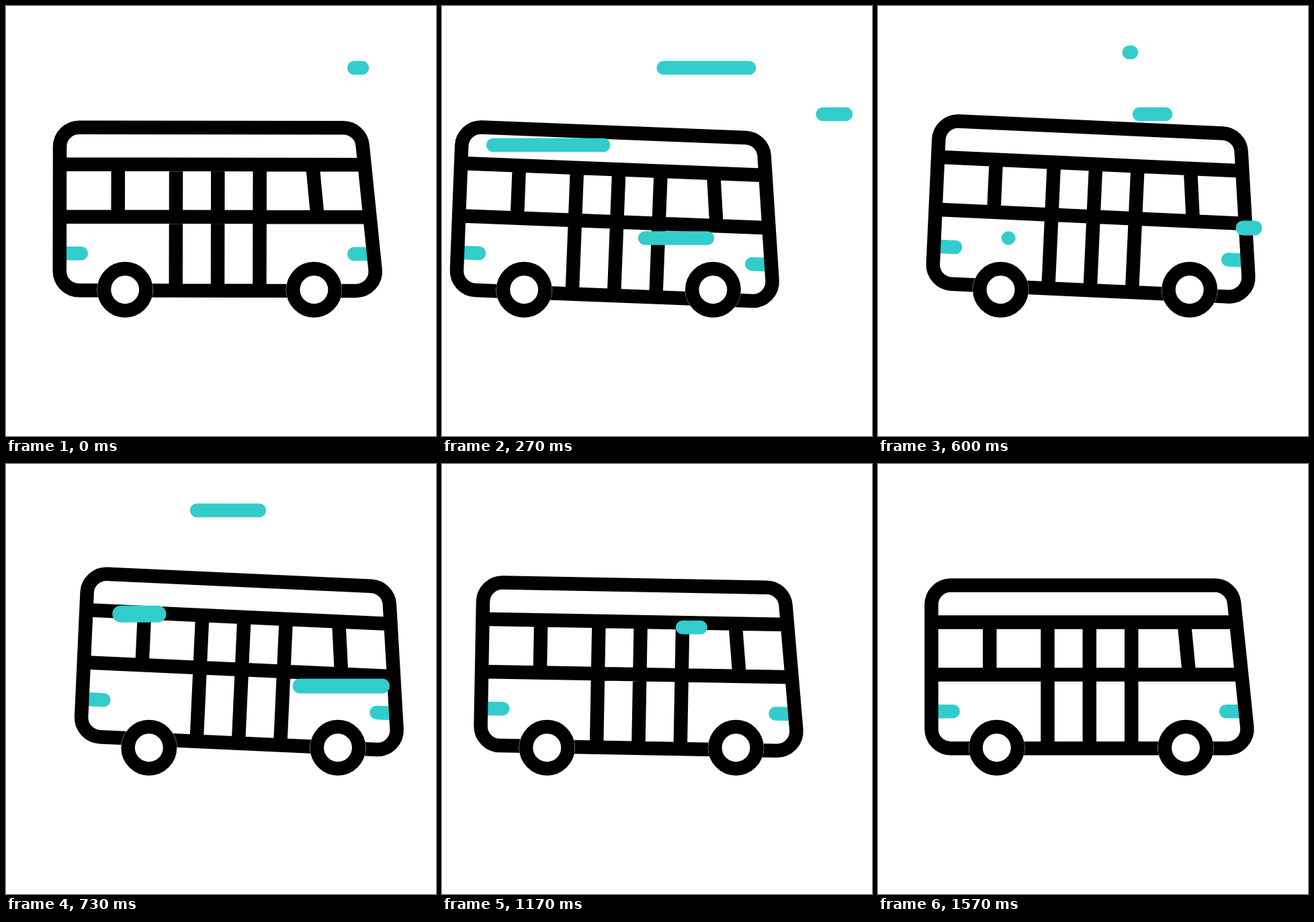
Write an HTML page with a canvas that moves like this. It is 640 px wide and 640 px high and loops after 1670 ms.

```html
<!DOCTYPE html>
<html lang="en">
<head>
<meta charset="utf-8">
<title>Bus</title>
<style>
  html, body { margin: 0; width: 100%; height: 100%; overflow: hidden; background: #fff; }
  canvas { display: block; width: 100vw; height: 100vh; }
</style>
</head>
<body>
<canvas id="stage" width="640" height="640"></canvas>
<script>
const ctx = document.getElementById('stage').getContext('2d');
const LOOP = 1670, STEP = 100 / 3, LAST = 47;
const BLACK = '#000', CYAN = '#33cccc';

// Keys are [step, value]
const shiftX = [[0, .4], [8, -54.6], [9.8, -59.6], [14, -32.7], [22, 36], [24, 40],
  [29, 15.5], [35, -20.5], [36, -21], [47, 0]];
const bodyY = [[0, .4], [8, 7.9], [13, 8], [14, 7.75], [22, -7.5], [24, -8],
  [29, -5.75], [35, -.3], [36.5, 0], [47, 0]];
const tilt = [[0, .1], [8, 2.25], [11, 2.62], [28.5, 2.62], [35, 1.05], [40, 0], [47, 0]];

// Wind streaks run from right to left; the tail follows the head
const streaks = [
  { y: 92, from: 530, to: 328, head: -1.47, tail: 3.94 },
  { y: 161, from: 601, to: 389, head: 5.45, tail: 10.74 },
  { y: 207, from: 284, to: 54, head: 1.05, tail: 5.6, span: 8.6 },
  { y: 345.4, from: 395, to: 194, head: 3.25, tail: 8.2 },
  { y: 69, from: 377, to: 176, head: 17.25, tail: 23 },
  { y: 223.2, from: 226, to: 30, head: 18.5, tail: 24.15, width: 25 },
  { y: 330.4, from: 560.5, to: 362, head: 16.2, tail: 21.7, width: 22 },
  { y: 243.2, from: 561, to: 358, head: 23.4, tail: 28.2, span: 8.8 },
];

const body = new Path2D(`M108.3 180.6H501.5A28.8 28.8 0 0 1 530.1 206.4L549.3 391.4
  A28.8 28.8 0 0 1 520.7 423.2H108.3A28.8 28.8 0 0 1 79.5 394.4V209.4
  A28.8 28.8 0 0 1 108.3 180.6ZM79.5 235.4H533M79.5 313.5H541M166.3 235V313
  M252.5 235V423M314.8 235V423M377.2 235V423M455.7 235.4L463.2 313.5`);

const ease = p => {
  p = Math.min(1, Math.max(0, p));
  return p * p * (3 - 2 * p);
};

// Monotone cubic through the keys, at rest at every extreme
function valueAt(keys, f) {
  const rise = i => (keys[i + 1][1] - keys[i][1]) / (keys[i + 1][0] - keys[i][0]);
  const slope = i => {
    if (i === 0 || i === keys.length - 1) return 0;
    const a = rise(i - 1), b = rise(i);
    return a * b <= 0 ? 0 : 2 * a * b / (a + b);
  };
  let i = 0;
  while (i < keys.length - 2 && f >= keys[i + 1][0]) i++;
  const [f0, v0] = keys[i], [f1, v1] = keys[i + 1];
  const h = f1 - f0, p = (f - f0) / h, q = 1 - p;
  return v0 + (v1 - v0) * ease(p) + h * p * q * (q * slope(i) - p * slope(i + 1));
}

function line(x1, x2, y, width = 20.5) {
  ctx.strokeStyle = CYAN;
  ctx.lineWidth = width;
  ctx.lineCap = 'round';
  ctx.beginPath();
  ctx.moveTo(x1, y);
  ctx.lineTo(x2, y);
  ctx.stroke();
}

function wheel(x) {
  const y = 422.3;
  ctx.fillStyle = '#fff';
  ctx.beginPath();
  ctx.arc(x, y, 41.8, 0, 7);
  ctx.fill();
  ctx.strokeStyle = BLACK;
  ctx.lineWidth = 20.5;
  ctx.beginPath();
  ctx.arc(x, y, 31.2, 0, 7);
  ctx.stroke();
}

function drawBus(f) {
  ctx.save();
  ctx.translate(valueAt(shiftX, f), 0);
  ctx.save();
  ctx.translate(315, 316 + valueAt(bodyY, f));
  ctx.rotate(valueAt(tilt, f) * Math.PI / 180);
  ctx.translate(-315, -316);
  line(84, 111.6, 368.2);
  line(518, 540, 368.2);
  ctx.strokeStyle = BLACK;
  ctx.lineCap = 'butt';
  ctx.stroke(body);
  ctx.restore();
  wheel(176.8);
  wheel(458);
  ctx.restore();
}

function drawStreak({ y, from, to, head, tail, width, span = 10 }, f) {
  if (f < head || f >= tail + span) return;
  const at = start => from + (to - from) * ease((f - start) / span);
  line(at(head), at(tail), y, width);
}

function draw(now) {
  const f = Math.min(LAST, Math.floor(now % LOOP / STEP + .2));
  ctx.fillStyle = '#fff';
  ctx.fillRect(0, 0, 640, 640);
  drawBus(f);
  streaks.forEach(s => drawStreak(s, f));
}

const start = performance.now();
function tick() {
  draw(performance.now() - start);
  requestAnimationFrame(tick);
}
tick();
</script>
</body>
</html>
```
